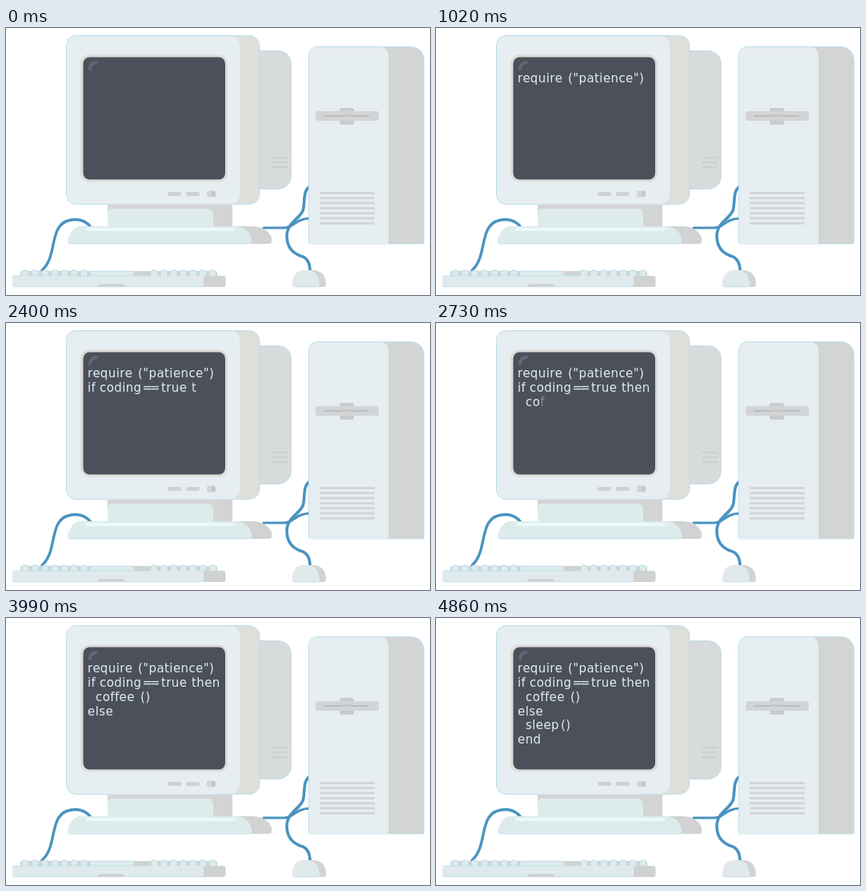
Animation, 530 px wide and 334 px high, one loop 6.84 s. Source, as an HTML page with a canvas:

```html
<!DOCTYPE html>
<html lang="en">
<head>
<meta charset="utf-8">
<title>Patience</title>
<style>
  html, body { margin: 0; width: 100%; height: 100%; overflow: hidden; background: #fff; }
  canvas { display: block; width: 530px; height: 334px; }
</style>
</head>
<body>
<canvas id="stage" width="530" height="334"></canvas>
<script>
const ctx = document.getElementById('stage').getContext('2d');
const LOOP = 6840, STEP = 30;
const LIGHT = '#e6eef1', PALE = '#deebec', SHADE = '#d3d5d4', EDGE = '#b8dcee', CABLE = '#4a93bf';

// Each block types characters along [time, count] keys; words are [x, baseline, first index, text].
const blocks = [
  { keys: [[420, 0], [1020, 19]],
    words: [[102, 68, 0, 'require'], [165, 68, 7, '("patience")']] },
  { keys: [[1650, 0], [1980, 7], [2400, 19], [3030, 35]],
    words: [[102, 86, 0, 'if'], [117, 86, 3, 'coding'], [170.5, 86, 10, '='], [180, 86, 11, '='],
            [194, 86, 13, 'true'], [232, 86, 18, 'then'], [112, 104, 25, 'coffee'], [168, 104, 31, '()']] },
  { keys: [[3450, 0], [3780, 4]], words: [[102, 122, 0, 'else']] },
  { keys: [[3960, 0], [4290, 10]], words: [[112, 139, 3, 'sleep'], [156, 139, 8, '()']] },
  { keys: [[4560, 0], [4860, 3]], words: [[102, 157, 0, 'end']] }
];

function box(x, y, w, h, r, fill, edge) {
  ctx.beginPath();
  ctx.roundRect(x, y, w, h, r);
  ctx.fillStyle = fill;
  ctx.fill();
  if (edge) {
    ctx.strokeStyle = EDGE;
    ctx.lineWidth = 0.8;
    ctx.stroke();
  }
}

function shape(path, fill) {
  ctx.fillStyle = fill;
  ctx.fill(new Path2D(path));
}

function line(path, color, width) {
  ctx.strokeStyle = color;
  ctx.lineWidth = width;
  ctx.lineCap = 'round';
  ctx.stroke(new Path2D(path));
}

function rows(x, y, w, h, gap, count, color) {
  for (let i = 0; i < count; i++) box(x, y + i * gap, w, h, 1, color);
}

function drawCables() {
  line('M45 303C67 284 50 240 87 239.5Q99 240 106 249', CABLE, 3.4);
  line('M322 250H348C360 250 360 239 380 238', CABLE, 3.2);
  line('M380 198C371 203 374 216 371.5 227C369 238 351 243 351 260C351 276 360 282 368 285Q380 288 380 304', CABLE, 3.6);
}

function drawTower() {
  box(379, 23.5, 143.5, 246.5, [11, 16, 2, 2], SHADE, true);
  box(378.5, 23.5, 99.5, 246.5, [11, 10, 0, 2], LIGHT);
  line('M378.5 269V34Q379 24 389 23.5H468', EDGE, 0.8);
  box(417, 100, 18, 21, 3, '#c8cbcd');
  box(387, 104, 79, 12, 3, '#d2d4d6');
  box(397, 109, 57, 2, 1, '#b9bdc0');
  box(420, 108, 12, 3, 1, '#c4c7c9');
  rows(392, 205, 69, 3, 6.3, 7, '#d2d5d6');
}

function drawMonitor() {
  box(290, 28.5, 66.5, 173, 16, '#d7dbdb', true);
  rows(332, 161, 20, 2, 6, 3, '#cdd0d0');

  box(127, 218, 156, 31, 0, SHADE);
  box(127, 226, 132, 23, [5, 7, 0, 0], PALE);

  shape('M94 248H310Q326 249 332 262V267Q332 270 329 270H80Q77 270 77 267Q82 248 94 248Z', '#d0d3d2');
  shape('M94 248H290Q303 250 307 263V267Q307 270 303 270H80Q77 270 77 267Q82 248 94 248Z', PALE);
  line('M101 252H285', '#e9fafb', 4);
  line('M80 270H303', EDGE, 0.8);

  box(75.5, 9.5, 241.5, 211, 13, '#dededb', true);
  box(75.5, 9.5, 217, 211, 13, LIGHT);
  line('M292 9.5H88Q76 10 75.5 22V208Q76 220 88 220.5H126', EDGE, 0.8);

  box(93, 33.5, 184, 159, 11, '#dedcd9');
  box(96.5, 36.5, 177.5, 153, 8, '#4b505a');
  line('M105 51Q105 44 113 43', '#626770', 4);

  box(202, 205, 17, 5, 2, '#cfd2d3');
  box(225, 205, 17, 5, 2, '#cfd2d3');
  box(251, 203.5, 11, 8, 3, '#d2d4d5');
  box(257, 204, 5, 7, 2.5, '#c3c6c7');
}

function drawKeys(x, count) {
  for (let i = 0; i < count; i++) box(x + i * 12.2, 303, 8.5, 9, [3, 3, 0, 0], PALE, true);
}

function drawKeyboard() {
  box(18, 304, 246, 8, 2, '#d0d3d2');
  drawKeys(20, 7);
  drawKeys(181, 7);
  box(105, 304, 55, 8, [3, 3, 0, 0], PALE, true);
  box(8, 310, 266.5, 14, 3, '#d0d2d1');
  box(8, 310, 239, 14, [3, 0, 2, 3], '#e0eaec');
  line('M10 310H180', EDGE, 0.8);
  line('M10 323.7H247', EDGE, 0.8);
  shape('M114 324Q115 320 119 320H144Q148 320 149 324Z', '#cdd2d3');
}

function drawMouse() {
  shape('M358 321Q359 303 373 303H386Q400 305 400 321Q400 324 397 324H361Q358 324 358 321Z', '#d0d4d3');
  shape('M358 321Q359 303 373 303H380Q391 306 392 321Q392 324 389 324H361Q358 324 358 321Z', '#e0eaeb');
  line('M361 324H389', EDGE, 0.7);
}

function typedCount(keys, t) {
  if (t <= keys[0][0]) return 0;
  for (let i = 1; i < keys.length; i++) {
    const [t0, n0] = keys[i - 1], [t1, n1] = keys[i];
    if (t <= t1) return n0 + (n1 - n0) * (t - t0) / (t1 - t0);
  }
  return keys[keys.length - 1][1];
}

function drawText(t) {
  ctx.font = '15px "DejaVu Sans", sans-serif';
  ctx.letterSpacing = '0.4px';
  ctx.fillStyle = '#e0eef0';
  for (const { keys, words } of blocks) {
    const count = typedCount(keys, t);
    for (const [x, y, first, text] of words) {
      for (let i = 0; i < text.length && first + i < count; i++) {
        ctx.globalAlpha = Math.min(1, count - first - i);
        ctx.fillText(text[i], x + ctx.measureText(text.slice(0, i)).width, y);
      }
    }
  }
  ctx.globalAlpha = 1;
}

function render(now) {
  const t = Math.floor((now % LOOP) / STEP) * STEP;
  ctx.fillStyle = '#fff';
  ctx.fillRect(0, 0, 530, 334);
  drawCables();
  drawTower();
  drawMonitor();
  drawKeyboard();
  drawMouse();
  drawText(t);
}

const start = performance.now();
function tick() {
  render(performance.now() - start);
  requestAnimationFrame(tick);
}
tick();
</script>
</body>
</html>
```
